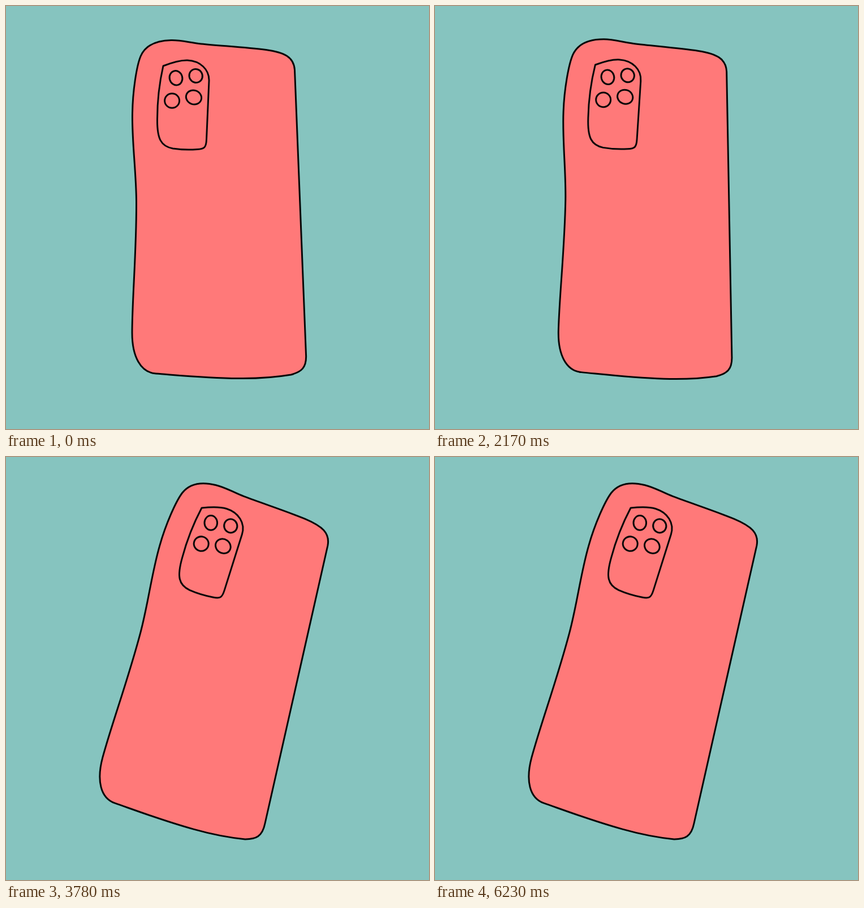
Recreate the animation shown at these times as an HTML page. Size 748 px wide and 748 px high, loop 6.3 s.

```html
<!DOCTYPE html>
<html lang="en">
<head>
<meta charset="utf-8">
<title>Wiggling phone</title>
<style>
  html, body { margin: 0; width: 100%; height: 100%; overflow: hidden; background: #86c4bf; }
  svg { display: block; width: 100vw; height: 100vh; }
  #phone { fill: #ff7979; stroke: #080808; stroke-width: 3; stroke-linejoin: round; }
</style>
</head>
<body>
<svg viewBox="0 0 748 748">
  <g id="phone">
    <path d="M223.5 190C224 150 231 106 238 89C247 68 267 61 292 60.5C310 60 325 65 345 67C380 70.5 425 73 460 77.5C492 82 509 90 510.5 113L530.5 616C532 640 522 647 504 652C480 656 450 659 411 658.5C355 658 305 653 265 650C238 648 223 620 223 578C223 520 231 430 230.5 345C230 290 222.5 240 223.5 190Z"/>
    <path d="M278 106C296 99 310 95.5 321 96C343 97 360 112 359 133L354.5 236C354 250 351 253 338 253.5C325 254.5 308 254 295 252C274 248 267 235 267.5 200C267.5 165 273 128 278 106Z"/>
    <ellipse cx="300.5" cy="127.3" rx="11.3" ry="12.8" transform="rotate(-15 300.5 127.3)"/>
    <ellipse cx="335.7" cy="123.5" rx="11.6" ry="12.1" transform="rotate(-30 335.7 123.5)"/>
    <ellipse cx="293.6" cy="167.5" rx="13" ry="12.8"/>
    <ellipse cx="332" cy="161.5" rx="13.8" ry="12.3" transform="rotate(20 332 161.5)"/>
  </g>
</svg>
<script>
  const STEP = 70, LOOP = 90, TILT = 15;
  const PIVOT = '372.7 356.5';
  // Lengths of the alternating swings (right, back, right, ...), in steps.
  const swings = [4, 4, 4, 4, 4, 3, 4, 3, 5, 3, 5, 6, 5, 4, 4, 4, 6, 4, 4, 5, 4, 1];
  const phone = document.getElementById('phone');

  // cubic-bezier(.42, 0, .58, 1)
  function easeInOut(x) {
    let lo = 0, hi = 1;
    for (let i = 0; i < 30; i++) {
      const s = (lo + hi) / 2, r = 1 - s;
      if (1.26 * s * r * r + 1.74 * s * s * r + s ** 3 < x) lo = s; else hi = s;
    }
    return lo * lo * (3 - 2 * lo);
  }

  function angleAt(step) {
    let i = 0;
    while (step >= swings[i]) step -= swings[i++];
    const p = easeInOut(step / swings[i]);
    return TILT * (i % 2 ? 1 - p : p);
  }

  function draw(now) {
    const step = Math.floor(now / STEP) % LOOP;
    phone.setAttribute('transform', `rotate(${angleAt(step).toFixed(3)} ${PIVOT})`);
    requestAnimationFrame(() => draw(performance.now()));
  }
  draw(0);
</script>
</body>
</html>
```
